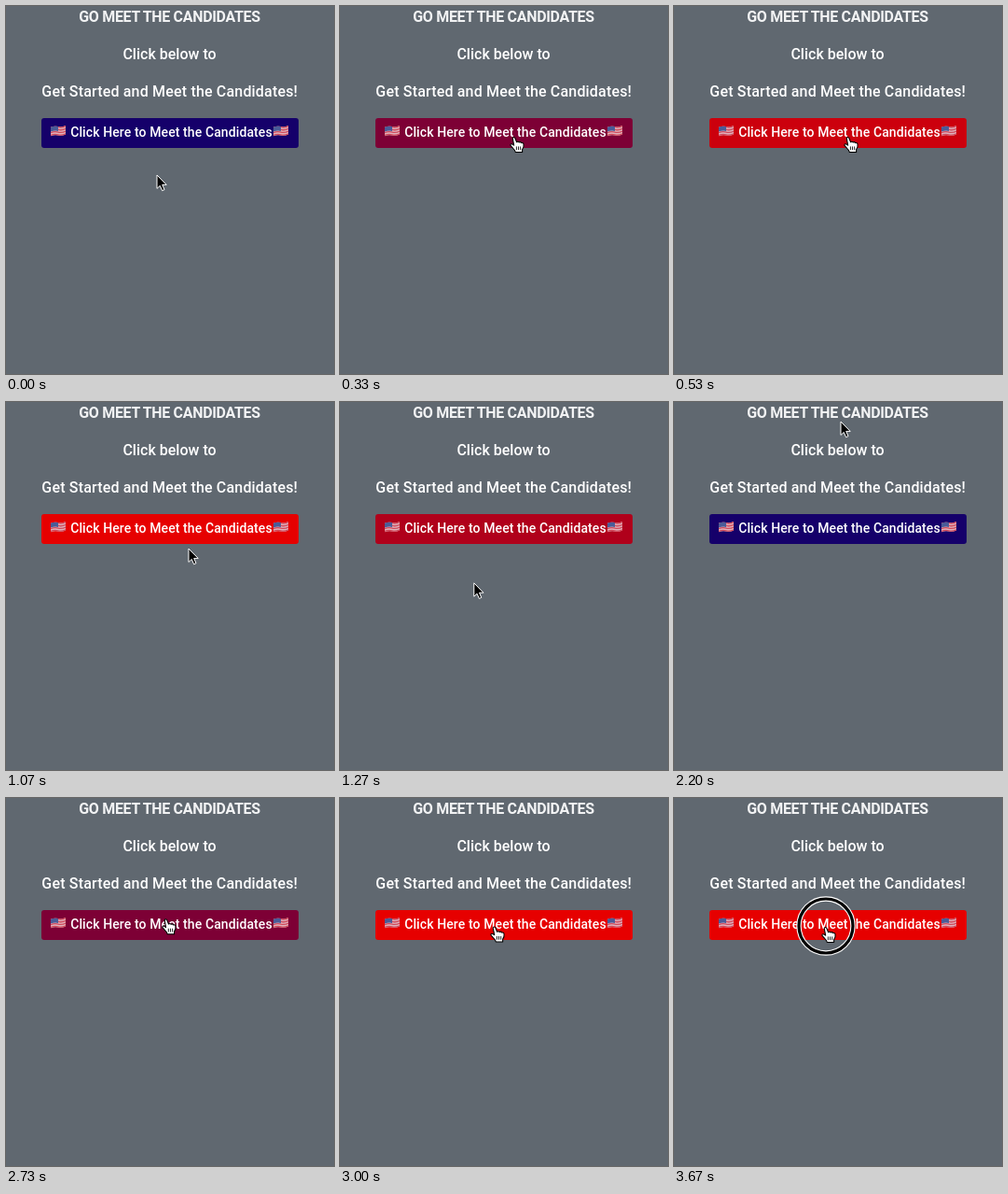
Animation of 352 by 394 pixels, one loop 3.74 s. Source, as an HTML page:

```html
<!DOCTYPE html>
<html lang="en">
<head>
<meta charset="utf-8">
<title>Meet the Candidates</title>
<style>
  html, body { margin: 0; width: 100%; height: 100%; overflow: hidden; background: #606870; }
  svg { display: block; width: 352px; height: 394px; }
  text { font: 500 16px Roboto, "Open Sans", sans-serif; fill: #fff; text-anchor: middle; }
  .title { font-weight: 700; letter-spacing: -.33px; fill: #f2f3f4; }
  .lead { letter-spacing: .17px; }
  .label { font-size: 14px; letter-spacing: .1px; }
</style>
</head>
<body>
<svg viewBox="0 0 352 394">
  <defs>
    <g id="flag">
      <path d="M0 2.2Q4 .6 8 1.6T16 .6V10Q12 12 8 11T0 11.8Z" fill="#dfb4be"/>
      <g fill="none" stroke="#d0485a" stroke-width="1.3">
        <path id="stripe" d="M0 2.8Q4 1.2 8 2.2T16 1.2"/>
        <use href="#stripe" y="2.7"/>
        <use href="#stripe" y="5.4"/>
        <use href="#stripe" y="8.1"/>
      </g>
      <path d="M0 2.2Q4 .6 8 1.6V6.4Q4 5.6 0 7Z" fill="#4a5c98"/>
    </g>
  </defs>
  <rect width="352" height="394" fill="#606870"/>
  <text class="title" x="175.5" y="17">GO MEET THE CANDIDATES</text>
  <text x="175.5" y="57">Click below to</text>
  <text class="lead" x="175.7" y="97">Get Started and Meet the Candidates!</text>
  <rect id="button" x="38" y="120" width="276" height="32" rx="3"/>
  <text class="label" x="177.5" y="140">Click Here to Meet the Candidates</text>
  <use href="#flag" x="48" y="127.5"/>
  <use href="#flag" x="287" y="127.5"/>
  <g id="ring" fill="none">
    <circle r="29" stroke="#fff" stroke-width="5.4"/>
    <circle r="29" stroke="#000" stroke-width="3.2"/>
  </g>
  <path id="arrow" d="M0 0V14.4L3.3 11.4L5.6 16.7L8 15.6L5.7 10.4H10.2Z"
        fill="#000" stroke="#fff" stroke-linejoin="round"/>
  <g id="hand" stroke="#000" stroke-linejoin="round" stroke-linecap="round">
    <path fill="#fff" d="M-1.6 1.5Q-1 -.2 .6 1L2.4 5.3Q3.8 4.3 4.8 5.5Q6.2 4.6 7.2 6.1Q9 5.6 9.3 7.4
      Q9.8 10.4 8 12.6V15.3H1.3Q.7 13.2-1 11.7L-3.7 8.7Q-4 6.6-1.9 7.4L-.3 8.5Z"/>
    <path d="M2.2 10V12.8M4.2 10V12.8M6.2 10V12.8" stroke-width=".8"/>
  </g>
</svg>
<script>
  const LOOP = 3740, FPS = 15, FADE = 530, CLICK = 3600;
  const BLUE = [21, 0, 106], RED = [230, 0, 0];
  const HOME = { x: 162, y: 181 };

  // The pointer rests between moves.
  const moves = [
    { start: 0, end: 330, x: 187, y: 140 },
    { start: 870, end: 1065, x: 196, y: 157 },
    { start: 1065, end: 1330, x: 135, y: 200 },
    { start: 1330, end: 1600, x: 48, y: 101 },
    { start: 1600, end: 1870, x: 62, y: 20 },
    { start: 1930, end: 2200, x: 179, y: 21 },
    { start: 2200, end: 2470, x: 222, y: 60 },
    { start: 2470, end: 2800, x: 166, y: 137.5 },
    { start: 3400, end: CLICK, x: 163, y: 138 }
  ];

  const el = id => document.getElementById(id);
  const ramp = (t, start, end) => Math.min(1, Math.max(0, (t - start) / (end - start)));
  const fade = (t, start) => ramp(t, start, start + FADE);
  const lerp = (a, b, p) => a + (b - a) * p;
  const ease = p => p * p * (3 - 2 * p);
  const show = (node, on) => node.style.display = on ? "" : "none";
  const place = (node, x, y, scale = 1) =>
    node.setAttribute("transform", `translate(${x} ${y}) scale(${scale})`);

  function pointerAt(t) {
    return moves.reduce((from, to) => {
      const p = ease(ramp(t, to.start, to.end));
      return { x: lerp(from.x, to.x, p), y: lerp(from.y, to.y, p) };
    }, HOME);
  }

  function draw(ms) {
    const t = Math.floor((ms + 5) * FPS / 1000) * 1000 / FPS;
    const { x, y } = pointerAt(t);
    const hover = x >= 38 && x < 314 && y >= 120 && y < 152;
    const redness = fade(t, 70) - fade(t, 1130) + fade(t, 2470);
    const color = BLUE.map((c, i) => Math.round(lerp(c, RED[i], redness)));

    el("button").setAttribute("fill", `rgb(${color})`);
    show(el("hand"), hover);
    show(el("arrow"), !hover);
    place(el("hand"), x, y, 1.08);
    place(el("arrow"), x, y);
    show(el("ring"), t >= CLICK);
    place(el("ring"), x, y - 1, lerp(1.12, 1, ramp(t, CLICK, CLICK + 1000 / FPS)));
  }

  const start = performance.now();
  function tick() {
    draw((performance.now() - start) % LOOP);
    requestAnimationFrame(tick);
  }
  tick();
</script>
</body>
</html>
```
